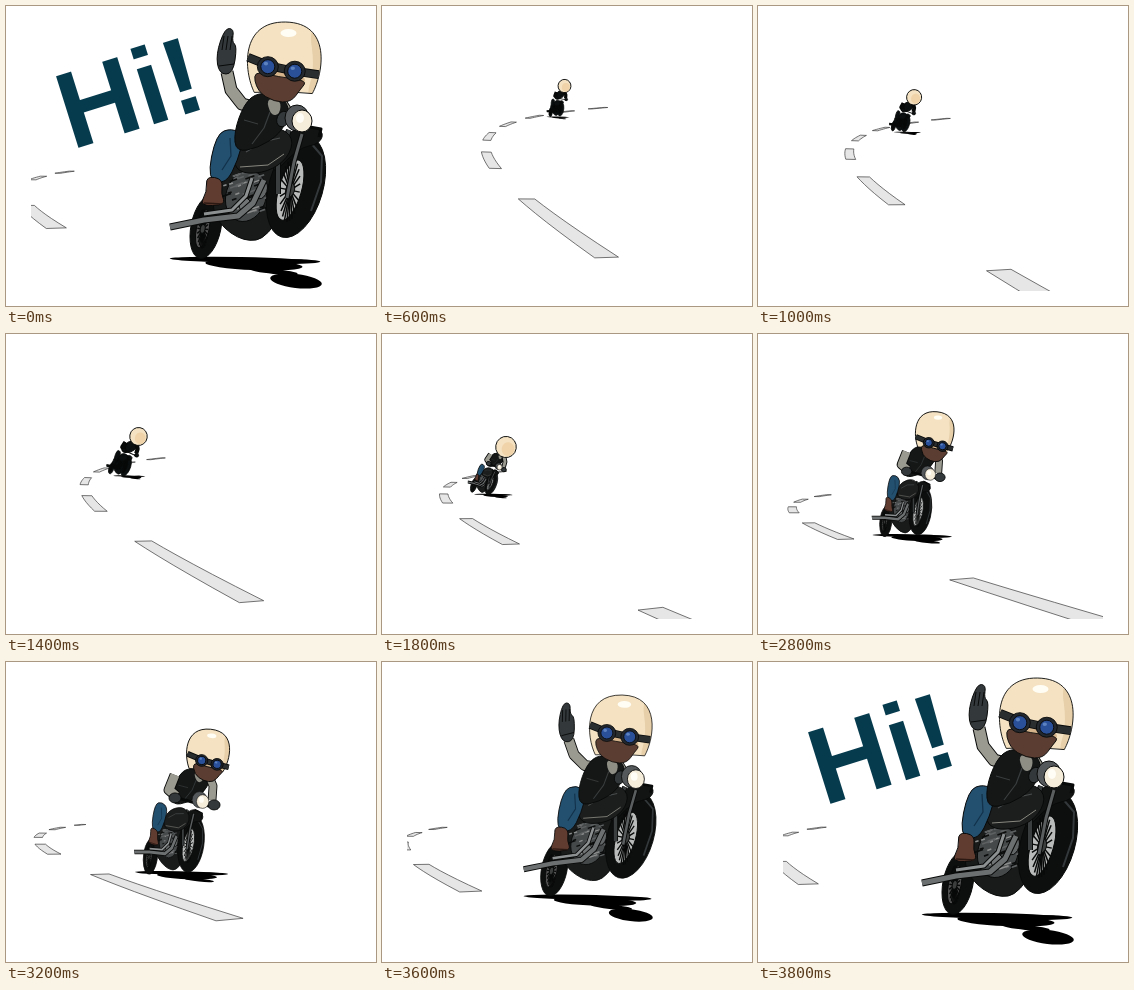
These frames come from a looping animation (370 px wide and 300 px high, 4 s). An HTML page with a canvas:

```html
<!DOCTYPE html>
<html lang="en">
<head>
<meta charset="utf-8">
<title>Hi!</title>
<style>
html, body { margin: 0; width: 100%; height: 100%; overflow: hidden; background: #fff; }
canvas { display: block; }
</style>
</head>
<body>
<canvas id="stage" width="370" height="300"></canvas>
<script>
const ctx = document.getElementById('stage').getContext('2d');
const STEP = 200, FRAMES = 20, LAST = 3800;
const INK = '#080909', CREAM = '#f4e2c2', JEANS = '#24506f', BOOT = '#603c30';
const VEST = '#151717', SLEEVE = '#9b9a90', STEEL = '#77797a', GLOVE = '#33383a';
let pen = 1, dark = false;

// Smooth curve through rows of values placed at xs.
function curve(xs, rows, x) {
  const n = xs.length;
  x = Math.min(Math.max(x, xs[0]), xs[n - 1]);
  let i = 0;
  while (i < n - 2 && x > xs[i + 1]) i++;
  const h = xs[i + 1] - xs[i], s = (x - xs[i]) / h;
  const slope = (j, c) => {
    const a = Math.max(j - 1, 0), b = Math.min(j + 1, n - 1);
    return (rows[b][c] - rows[a][c]) / (xs[b] - xs[a]);
  };
  return rows[i].map((p, c) => p + (rows[i + 1][c] - p) * s * s * (3 - 2 * s) +
    h * s * (1 - s) * ((1 - s) * slope(i, c) - s * slope(i + 1, c)));
}
function random(seed) {
  return () => (seed = seed * 16807 % 2147483647) / 2147483647;
}

// ---- road: a parabola on the ground seen in perspective ----
// Camera keys: horizon, height, distance, road offset, road heading.
const BEND = 39, DASH_WIDTH = 23, LENS = 400;
const CAMERA_TIMES = [600, 1400, 2400, 3200, 3800];
const CAMERA = [
  [80, 158.8, .926, 208, -28.7],
  [102, 138, .833, 204.6, -69.6],
  [137, 92, .672, 195.4, -123.7],
  [147, 76.4, .441, 185, -131.4],
  [147, 83.3, .108, 159.7, -142.9]
];

function drawRoad(t) {
  const [horizon, height, dist, offset, heading] = curve(CAMERA_TIMES, CAMERA, t);
  const edge = (u, side) => {
    const turn = heading + 2 * BEND * u;
    const k = side * DASH_WIDTH / 2 / Math.hypot(turn, LENS);
    const x = offset + heading * u + BEND * u * u + k * LENS;
    const z = Math.max(dist + u - k * turn / LENS, .03);
    return [x / z, horizon + height / z];
  };
  const reach = 6.6 - 2.1 * Math.min(Math.max((t - 600) / 1800, 0), 1);
  const phase = ((t - 600) / 800 % 1 + 1) % 1;
  ctx.fillStyle = '#e6e6e6';
  ctx.strokeStyle = '#3c3c3c';
  ctx.lineWidth = .7;
  for (let k = -1; k < 7; k++) {
    const a = Math.max(k + phase, .08 - dist), b = Math.min(k + phase + .48, reach);
    if (a >= b) continue;
    ctx.beginPath();
    for (const side of [-1, 1])
      for (let i = 0; i <= 6; i++) {
        const f = side < 0 ? i / 6 : 1 - i / 6;
        ctx.lineTo(...edge(a + (b - a) * f, side));
      }
    ctx.closePath();
    ctx.fill();
    ctx.stroke();
  }
}

// ---- drawing helpers ----
function paint(fill, outline = true) {
  if (fill) { ctx.fillStyle = dark ? '#0c1010' : fill; ctx.fill(); }
  if (outline) { ctx.strokeStyle = INK; ctx.lineWidth = pen; ctx.stroke(); }
}
// Closed shape with rounded corners.
function blob(fill, pts, outline) {
  const n = pts.length;
  ctx.beginPath();
  ctx.moveTo((pts[n - 2] + pts[0]) / 2, (pts[n - 1] + pts[1]) / 2);
  for (let i = 0; i < n; i += 2) {
    const x = pts[i], y = pts[i + 1];
    ctx.quadraticCurveTo(x, y, (x + pts[(i + 2) % n]) / 2, (y + pts[(i + 3) % n]) / 2);
  }
  ctx.closePath();
  paint(fill, outline);
}
function oval(fill, x, y, rx, ry = rx, rot = 0, outline = true) {
  ctx.beginPath();
  ctx.ellipse(x, y, rx, ry, rot, 0, 7);
  paint(fill, outline);
}
function stroke(color, width, ...pts) {
  ctx.beginPath();
  for (let i = 0; i < pts.length; i += 2) ctx.lineTo(pts[i], pts[i + 1]);
  ctx.strokeStyle = dark ? INK : color;
  ctx.lineWidth = width;
  ctx.stroke();
}
function tube(color, width, ...pts) {
  stroke(INK, width + 2 * pen, ...pts);
  stroke(color, width, ...pts);
}
function within(matrix, draw) {
  ctx.save();
  ctx.transform(...matrix);
  draw();
  ctx.restore();
}

// ---- parts, in close-up coordinates ----
function wheel(x, y, rx, ry, rot, gap) {
  const c = Math.cos(rot), s = Math.sin(rot);
  oval('#0d0e0e', x, y, rx, ry, rot);
  within([c, s, -s, c, x - rx * .22, y + ry * .06], () => {
    oval(gap, 0, 0, rx * .42, ry * .6);
    for (let i = 0; i < 24; i++) {
      const a = i * Math.PI / 12;
      stroke(INK, 1.5, 0, 0, Math.cos(a) * rx * .42, Math.sin(a + .5) * ry * .6);
    }
    oval('#3c3e3e', 0, 0, rx * .16, ry * .14);
  });
}

function bike() {
  wheel(200, 221, 15, 32, .2, '#555');
  blob('#191b1b', [204, 190, 226, 146, 282, 130, 290, 180, 262, 232, 238, 236, 212, 218]);

  // engine: fins and scattered glints
  oval('#46494a', 240, 190, 20, 26, .3);
  const rnd = random(77);
  for (let i = 0; i < 46; i++) {
    const a = rnd() * 6.3, r = Math.sqrt(rnd()) * 23, len = 3 + rnd() * 7;
    const x = 238 + Math.cos(a) * r, y = 190 + Math.sin(a) * r * 1.1;
    stroke(['#8b8d8d', '#0b0c0c', '#5e6162'][i % 3], 1.6, x, y, x + len, y - len * .35);
  }
  oval('#727576', 239, 199, 6, 7);
  oval('#636667', 256, 184, 5, 9, .3);
  tube('#6d7071', 5, 164, 221, 198, 214, 232, 210, 247, 197, 258, 174);
  tube('#8d9091', 3, 198, 208, 226, 204, 240, 190, 246, 172);

  wheel(290, 181, 27, 52, .28, '#b9bbbb');
  stroke('#33383a', 2, 304, 136, 316, 150, 315, 176, 305, 205);
  blob('#121313', [264, 172, 272, 138, 294, 118, 318, 124, 314, 138, 292, 142]);
  tube('#3b3e3f', 4, 283, 124, 272, 152, 272, 188);
  tube('#5b5e5f', 3, 296, 128, 288, 156, 281, 192);
  stroke(INK, 3, 298, 120, 315, 123, 313, 131);

  // tank and seat
  blob('#1c1e1e', [226, 156, 242, 132, 272, 120, 288, 132, 282, 152, 262, 166, 236, 168]);
  stroke('#4a4d4d', 1.2, 240, 146, 256, 136, 274, 132);
  stroke('#88887f', 1, 234, 161, 262, 159, 278, 148);

  // leg and boot
  blob(JEANS, [210, 128, 226, 122, 238, 130, 232, 154, 220, 178, 201, 174]);
  stroke('#12324b', 1.3, 224, 132, 225, 150, 216, 164);
  blob(BOOT, [200, 170, 217, 173, 215, 188, 220, 199, 193, 200, 201, 186]);
  stroke('#2c1913', 1.4, 198, 197, 216, 198);
}

function torso() {
  blob(VEST, [238, 98, 252, 86, 276, 90, 285, 106, 274, 128, 252, 142, 230, 146, 228, 126]);
  blob('#8e8e85', [260, 92, 275, 94, 274, 108, 265, 110], false);
  stroke('#3b3e3e', 1.2, 264, 106, 258, 122, 246, 138);
  stroke('#3b3e3e', 1, 238, 114, 252, 118);
}

function lamp(x, y, s) {
  within([s, 0, 0, s, x, y], () => {
    oval('#54585a', -4, -2, 12, 13);
    oval('#f5ecda', 1, 1, 10, 11);
    oval('#fffdf6', -1, -2, 4, 5, 0, false);
  });
}

function shadow(x, y, s) {
  within([s, 0, 0, s, x, y], () => {
    oval('#000', 0, 0, 44, 1.8, .02, false);
    oval('#000', 8, 3, 30, 3.2, .04, false);
    oval('#000', 30, 1, 19, 1.5, 0, false);
    oval('#000', 20, 7, 15, 1.6, .1, false);
  });
}

// Helmet 73 units wide; (dx, dy) slides the face across it.
function helmet(x, y, w, tilt, dx, dy, face) {
  const s = w / 73, c = Math.cos(tilt) * s, n = Math.sin(tilt) * s, old = pen;
  pen = .9 / s;
  within([c, n, -n, c, x, y], () => {
    if (!face) {
      oval(CREAM, 0, 0, 36, 37);
      return oval('#f0d3a8', 8, 6, 22, 24, 0, false);
    }
    const dome = new Path2D('M-29 35C-40 14-45-36 1-36S40 14 29 35Q0 32-29 35Z');
    ctx.fillStyle = CREAM;
    ctx.fill(dome);
    ctx.save();
    ctx.clip(dome);
    blob('#e6cfa9', [24, -34, 44, -20, 42, 40, 22, 40, 31, 10], false);
    oval('#fffdf4', 4, -25, 8, 4, 0, false);
    ctx.restore();
    ctx.lineWidth = pen;
    ctx.strokeStyle = INK;
    ctx.stroke(dome);

    ctx.translate(dx, dy);
    blob('#d5b48c', [-26, 10, 24, 14, 18, 34, -24, 32], false);
    blob('#5b3e31', [-31, 13, -6, 19, 24, 22, 17, 31, 8, 44, -9, 44, -26, 34]);
    const strap = 36 + dx * .8;
    tube('#2b2e2f', 7, -strap, 0, -15, 8, 11, 13, 35 - dx * .5, 16);
    for (const [gx, gy] of [[-16, 9], [11, 13]]) {
      oval('#23282e', gx, gy, 10.5, 10);
      oval('#2a509a', gx, gy, 7);
      oval('#5d82c0', gx - 2, gy - 3, 2.2, 1.8, 0, false);
    }
  });
  pen = old;
}

// ---- rider on the road: head x, y and ground x, y ----
const RIDE_TIMES = [600, 1400, 1800, 2400, 3200, 3600];
const RIDE = [
  [182.5, 80, 175, 110],
  [132.5, 102.5, 113, 141],
  [124, 113, 101, 159.5],
  [154, 102, 131, 193],
  [202, 88, 170, 210],
  [237, 64, 200, 246]
];

function drawRide(t) {
  const [hx, hy, gx, gy] = curve(RIDE_TIMES, RIDE, t);
  const size = Math.hypot(hx - gx, hy - gy), s = size / 126;
  const lean = Math.atan2(hx - gx, gy - hy) - Math.atan2(32, 122);
  const c = Math.cos(lean) * s, n = Math.sin(lean) * s;
  const far = s < .37;
  shadow(gx + 3 * s + 40 * lean, gy + 1, s);
  dark = far;
  within([c, n, -n, c, gx, gy], () => {
    ctx.translate(-170, -210);
    pen = Math.min(1.4 / s, 5);
    within([.45, .12, 0, .58, 54.5, 42.2], bike);
    within([.68, 0, 0, .62, 10.6, 52.6], torso);
    pen = Math.min(.9 / s, 3);
    tube(SLEEVE, 9, 169, 113, 163, 128, 170, 134);
    tube(SLEEVE, 7, 202, 112, 207, 124, 206, 138);
    stroke(INK, 3, 164, 134, 186, 140, 212, 146);
    oval(GLOVE, 169, 136, 6, 5);
    oval(GLOVE, 208, 143, 6, 5);
    if (!far) lamp(196, 139, .62);
  });
  dark = false;
  const near = Math.min(Math.max((t - 1800) / 1400, 0), 1);
  const width = .45 * size - .0009 * size * size;
  helmet(hx, hy, width, .1 + lean * .3, 7, 30 - 20 * near, t >= 2000);
}

// ---- rider up close, front wheel lifted, waving ----
function drawWave(wave) {
  pen = 1;
  shadow(235, 254, 1.62);
  oval('#000', 290, 275, 26, 7, .12, false);
  bike();

  ctx.save();
  ctx.translate(243, 100);
  ctx.rotate(wave);
  ctx.translate(-243, -100);
  tube(SLEEVE, 11, 221, 66, 225, 84, 236, 98, 250, 102);
  blob(GLOVE, [213, 68, 210, 48, 219, 22, 228, 23, 226, 36, 231, 40, 227, 68]);
  for (const x of [216, 220, 224]) stroke(INK, 1, x + 2, 30, x, 44);
  stroke(INK, 1, 213, 60, 228, 58);
  ctx.restore();

  tube(SLEEVE, 10, 274, 95, 281, 106, 278, 116);
  torso();
  oval(GLOVE, 277, 113, 6, 8, .4);
  lamp(295, 114, 1);
  helmet(278, 52, 73, .02, 0, 0, true);
}

function drawText() {
  ctx.save();
  ctx.translate(65.5, 144);
  ctx.rotate(-.303);
  ctx.fillStyle = '#063b4e';
  ctx.font = 'bold 109px "Liberation Sans", Arial, sans-serif';
  ctx.fillText('Hi!', 0, 0);
  ctx.restore();
}

function draw(t) {
  ctx.fillStyle = '#fff';
  ctx.fillRect(0, 0, 370, 300);
  ctx.save();
  ctx.beginPath();
  ctx.rect(25, 0, 320, 285);
  ctx.clip();
  ctx.lineJoin = 'round';
  drawRoad(t);
  if (t < 3600) {
    drawRide(t);
  } else if (t < LAST) {
    within([.85, 0, 0, .85, 2.3, 19.4], () => drawWave(-.12));
  } else {
    drawWave(0);
    drawText();
  }
  ctx.restore();
}

const start = performance.now();
function tick() {
  const n = Math.floor((performance.now() - start) / STEP) % FRAMES;
  draw(n ? n * STEP : LAST);
  requestAnimationFrame(tick);
}
draw(LAST);
requestAnimationFrame(tick);
</script>
</body>
</html>
```
